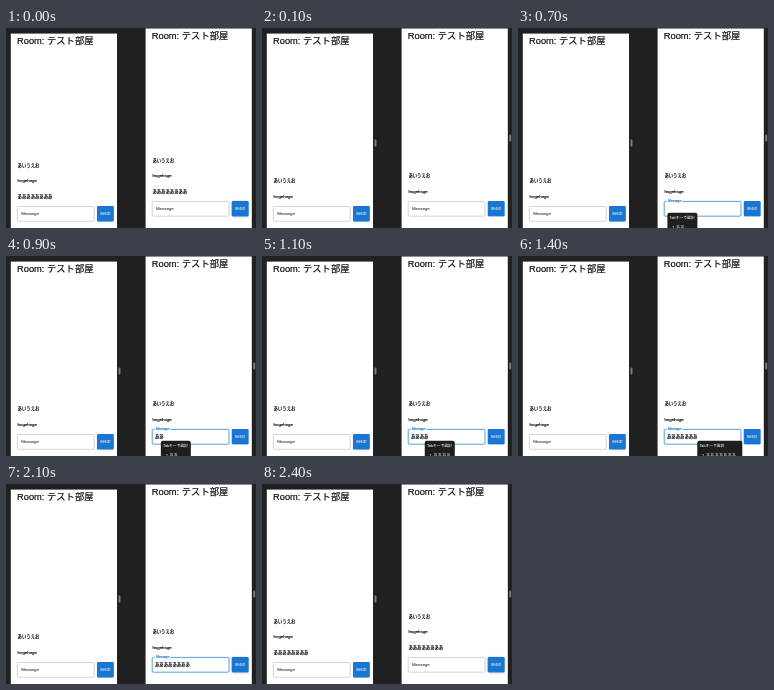
Recreate the animation shown at these times as an HTML page with a canvas. Size 250 by 200 pixels, loop 2.5 s.

```html
<!DOCTYPE html>
<html lang="ja">
<head>
<meta charset="utf-8">
<title>Chat room</title>
<style>
html, body { margin: 0; width: 100%; height: 100%; overflow: hidden; background: #212121; }
canvas { display: block; width: 250px; height: 200px; }
</style>
</head>
<body>
<canvas id="stage"></canvas>
<script>
const LOOP = 2500, STEP = 100;
const BLUE = '#1976d2', INK = '#0c0c10';
const FAMILY = '"Liberation Sans", "Noto Sans CJK JP", "Noto Sans CJK", sans-serif';
const canvas = document.getElementById('stage');
const ctx = canvas.getContext('2d');
const ratio = window.devicePixelRatio || 1;
canvas.width = 250 * ratio;
canvas.height = 200 * ratio;

const clamp = (v, lo, hi) => Math.max(lo, Math.min(hi, v));
const mix = (a, b, p) => a + (b - a) * p;

// Large font scaled down keeps tiny glyph advances unhinted; the outline adds weight.
function text(str, x, y, size, color = INK, outline = 1.6) {
  ctx.save();
  ctx.translate(x, y);
  ctx.scale(size / 40, size / 40);
  ctx.font = `40px ${FAMILY}`;
  ctx.fillStyle = ctx.strokeStyle = color;
  ctx.lineWidth = outline;
  ctx.lineJoin = 'round';
  ctx.fillText(str, 0, 0);
  ctx.strokeText(str, 0, 0);
  ctx.restore();
}

function box(x, y, w, h, r, color) {
  ctx.beginPath();
  ctx.roundRect(x, y, w, h, r);
  ctx.fillStyle = color;
  ctx.fill();
}

function drawField(focused, lift, typed, caret) {
  ctx.beginPath();
  ctx.roundRect(11.4, 178.5, 76.8, 14.8, 1.1);
  ctx.strokeStyle = focused ? '#3286d5' : '#b8b8b8';
  ctx.lineWidth = focused ? 0.8 : 0.6;
  ctx.stroke();
  if (lift > 0) {
    ctx.fillStyle = '#fff';
    ctx.fillRect(14, 178, 15.5 * lift, 1.4);
  }
  text('Message', 15.2, mix(187.2, 179.3, lift), mix(4.35, 3.26, lift), focused ? BLUE : '#606060');
  text('あ'.repeat(typed), 14.2, 187.1, 4.35);
  if (caret) {
    ctx.fillStyle = INK;
    ctx.fillRect(13.8 + typed * 4.3, 184, 0.5, 4);
  }
}

function drawButton(hover) {
  ctx.save();
  ctx.shadowColor = hover ? 'rgba(0,0,0,.4)' : 'rgba(0,0,0,.2)';
  ctx.shadowBlur = (hover ? 2 : 0.8) * ratio;
  ctx.shadowOffsetY = 0.4 * ratio;
  box(91, 178, 16.8, 15.4, 1.1, BLUE);
  ctx.restore();
  text('SEND', 93.9, 187.1, 3.8, '#e4effa', 0.6);
}

function drawRoom(x, y, messages, field, hover) {
  ctx.save();
  ctx.translate(x, y);
  ctx.fillStyle = '#fff';
  ctx.fillRect(4.8, 5.6, 106.2, 200);
  text('Room: テスト部屋', 11, 16.2, 9.3, INK, 0.8);
  messages.forEach((message, i) =>
    text(message, 11.6, 169.6 - (messages.length - 1 - i) * 15.3, 4.35));
  drawField(...field);
  drawButton(hover);
  ctx.restore();
}

function drawSuggestions(count) {
  const x = 149.4 + 2.1 * count + 0.31 * count * count;
  box(x, 184.7, Math.max(30, 10 + 5 * count), 20, 2, '#1e1e1e');
  text('Tabキーで選択', x + 2.2, 191.4, 3.75, '#eee', 0.6);
  text('1 ' + 'あ'.repeat(Math.max(2, count)), x + 4.8, 200.7, 4.35, '#ccc', 0.6);
}

function draw(t) {
  const sent = t < 100 || t >= 2300;
  const messages = ['あいうえお', 'hogehoge'];
  if (sent) messages.push('あ'.repeat(8));

  const focused = t >= 600 && t < 2200;
  const typed = sent ? 0 : clamp((t - 700) / STEP, 0, 8);
  const lift = t < 2300 ? clamp((t - 500) / 200, 0, 1) : clamp((2400 - t) / 200, 0, 1);
  const caret = t >= 1500 && t < 1700;
  const hover = t < 100 || t >= 2000;

  ctx.setTransform(ratio, 0, 0, ratio, 0, 0);
  ctx.fillStyle = '#212121';
  ctx.fillRect(0, 0, 250, 200);
  drawRoom(0, 0, messages, [false, 0, 0, false], false);
  drawRoom(134.8, -5.1, messages, [focused && !sent, sent ? 0 : lift, typed, caret], hover);
  if (t >= 100) {
    box(112.4, 111.5, 2.1, 7, 1, '#777');
    box(247.2, 106.5, 2.1, 7, 1, '#777');
  }
  if (t >= 700 && t < 1500) drawSuggestions(typed);
}

function frame(now) {
  draw(Math.floor((now % LOOP) / STEP) * STEP);
  requestAnimationFrame(frame);
}
draw(0);
requestAnimationFrame(frame);
</script>
</body>
</html>
```
